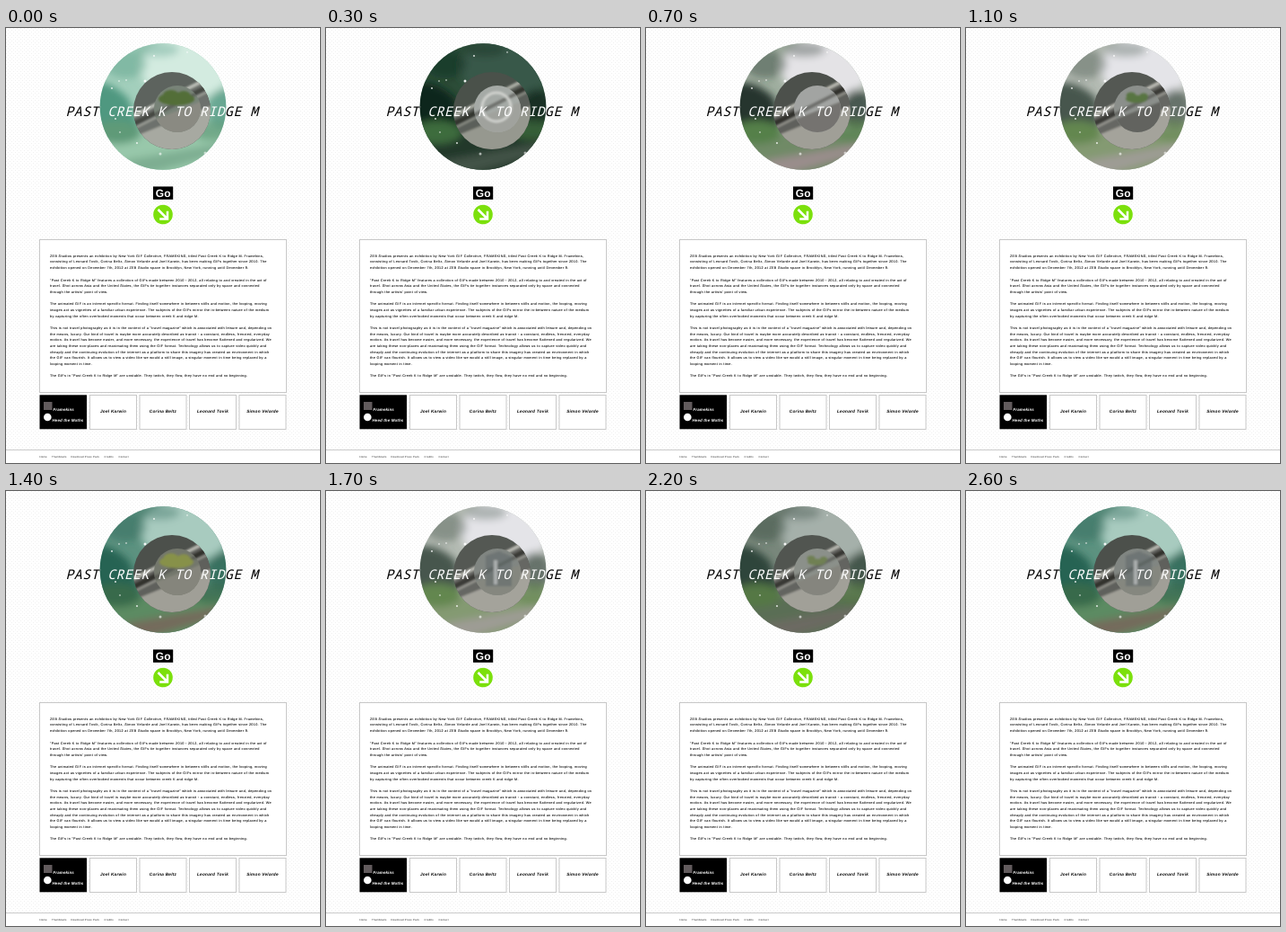
Write an HTML page that moves like this. It is 350x484 px and loops after 2700 ms.

```html
<!DOCTYPE html>
<html lang="en">
<head>
<meta charset="utf-8">
<title>Past Creek K to Ridge M</title>
<style>
html, body { margin: 0; width: 100%; height: 100%; overflow: hidden; background: #fff; }
svg { display: block; width: 350px; height: 484px; }
text { font-family: "Liberation Sans", Arial, sans-serif; text-rendering: geometricPrecision; white-space: pre; }
.title { font: italic 300 14.8px "Noto Sans Mono", "Liberation Mono", monospace; letter-spacing: .47px; }
.body { font-size: 3.75px; letter-spacing: .315px; fill: #000; stroke: #000; stroke-width: .06px; }
.tab { font-size: 4.7px; font-weight: bold; font-style: italic; letter-spacing: .25px; }
.logo { font-size: 4.5px; letter-spacing: .1px; }
.foot { font-size: 2.73px; letter-spacing: .26px; fill: #111; }
</style>
</head>
<body>
<svg viewBox="0 0 350 484" xmlns="http://www.w3.org/2000/svg">
  <defs>
    <pattern id="dots" width="4" height="4" patternUnits="userSpaceOnUse">
      <path d="M0 0h1v1h-1zM2 2h1v1h-1z" fill="#f0f0f0"/>
    </pattern>
    <clipPath id="big"><circle cx="175" cy="87.5" r="70.3"/></clipPath>
    <clipPath id="mid"><circle cx="185" cy="92" r="43"/></clipPath>
    <clipPath id="small"><circle cx="191" cy="90" r="26"/></clipPath>
    <mask id="outside" maskUnits="userSpaceOnUse" x="0" y="0" width="350" height="484">
      <rect width="350" height="484" fill="#fff"/><circle cx="175" cy="87.5" r="70.3"/>
    </mask>
    <filter id="soft" x="-50%" y="-50%" width="200%" height="200%"><feGaussianBlur stdDeviation="4"/></filter>
    <filter id="haze" x="-50%" y="-50%" width="200%" height="200%"><feGaussianBlur stdDeviation=".8"/></filter>
  </defs>
  <rect width="350" height="484" fill="#fff"/>
  <rect width="350" height="470" fill="url(#dots)"/>
  <g id="photo" clip-path="url(#big)"></g>
  <g id="window" clip-path="url(#mid)"></g>
  <g id="view" clip-path="url(#small)"></g>
  <g id="page"></g>
</svg>
<script>
const STEP = 100, STEPS = 27;
const TITLE = "PAST CREEK K TO RIDGE M";

const COPY = [
  "ZEB Studios presents an exhibition by New York GIF Collective, FRAMEKINS, titled Past Creek K to Ridge M. Framekins,",
  "consisting of Leonard Tovik, Corina Beltz, Simon Velarde and Joel Karwin, has been making GIFs together since 2010. The",
  "exhibition opened on December 7th, 2012 at ZEB Studio space in Brooklyn, New York, running until December 9.",
  "",
  "\"Past Creek K to Ridge M\" features a collection of GIFs made between 2010 - 2012, all relating to and created in the act of",
  "travel. Shot across Asia and the United States, the GIFs tie together instances separated only by space and connected",
  "through the artists' point of view.",
  "",
  "The animated GIF is an internet specific format. Finding itself somewhere in between stills and motion, the looping, moving",
  "images act as vignettes of a familiar urban experience. The subjects of the GIFs mirror the in-between nature of the medium",
  "by capturing the often overlooked moments that occur between creek K and ridge M.",
  "",
  "This is not travel photography as it is in the context of a \"travel magazine\" which is associated with leisure and, depending on",
  "the means, luxury. Our kind of travel is maybe more accurately described as transit - a constant, endless, frenzied, everyday",
  "motion. As travel has become easier, and more necessary, the experience of travel has become flattened and regularized. We",
  "are taking these non-places and reanimating them using the GIF format. Technology allows us to capture video quickly and",
  "cheaply and the continuing evolution of the internet as a platform to share this imagery has created an environment in which",
  "the GIF can flourish. It allows us to view a video like we would a still image, a singular moment in time being replaced by a",
  "looping moment in time.",
  "",
  "The GIFs in \"Past Creek K to Ridge M\" are unstable. They twitch, they flow, they have no end and no beginning."
];

// sky, trees, far field, hedge, ground, track
const SCENES = [
  ["#d3ebe0", "#4f9880", "#a3cfbc", "#5f9a78", "#98c8aa", "#78a98d"],
  ["#e4e3e6", "#26352e", "#9fae9f", "#55804a", "#6f8a66", "#a38f93"],
  ["#a8cbbf", "#286353", "#5c9280", "#386a4c", "#5c8b62", "#78645a"],
  ["#39594a", "#10251c", "#2c4d38", "#3e6c3d", "#20392a", "#48594c"],
  ["#a5b0aa", "#2f443a", "#78877b", "#547844", "#5a6e54", "#706a66"],
  ["#e4e4e8", "#46564d", "#b3bab2", "#64874f", "#849a72", "#a39d9b"]
];

// backdrop, lower half, foliage colour, foliage size, pale ring or tower
const VIEWS = [
  ["#788378", "#8a8a82", "#526e38", 1, 0],
  ["#7f847a", "#77766f", "#6d8a4a", 1, 0],
  ["#8b8f8b", "#62635f", "#587542", .6, 0],
  ["#a5aaa6", "#a0a29d", "#89918a", 0, 1],
  ["#8b908a", "#85857e", "#6f8052", .5, 0],
  ["#73776c", "#85857b", "#87914a", .95, 0],
  ["#90958e", "#85867f", "#78865c", .5, 0],
  ["#a2a4a2", "#75736f", "#8b8e8b", 0, 0],
  ["#818682", "#85877f", "#60686a", 0, 2]
];

const DROPS = [[155, 59], [127, 116], [122, 101], [172, 140], [165, 31], [202, 27], [235, 46], [126, 59], [146, 128], [222, 139], [118, 67], [134, 58]];

const $ = id => document.getElementById(id);
const attrs = o => Object.entries(o).map(([k, v]) => `${k}="${v}"`).join(" ");
const tag = (name, o) => `<${name} ${attrs(o)}/>`;
const rect = (x, y, width, height, fill, more = {}) => tag("rect", {x, y, width, height, fill, ...more});
const oval = (cx, cy, rx, ry, fill, more = {}) => tag("ellipse", {cx, cy, rx, ry, fill, ...more});
const disc = (cx, cy, r, fill, more = {}) => tag("circle", {cx, cy, r, fill, ...more});
const path = (d, fill, more = {}) => tag("path", {d, fill, ...more});
const text = (x, y, s, cls, more = {}) => `<text ${attrs({x, y, class: cls, ...more})}>${s}</text>`;
const panel = (x, y, w, h) => rect(x, y, w, h, "#fff", {stroke: "#c8c8c8"});

function photo(n) {
  const [sky, trees, field, hedge, ground, track] = SCENES[n];
  const dx = (n * 7) % 13 - 6;
  const drops = DROPS.map(([x, y], i) =>
    disc(x, y, i % 3 ? .9 : 1.5, "#fff", {opacity: i % 2 ? .6 : .9})).join("");
  return rect(100, 12, 150, 150, field) +
    `<g filter="url(#soft)">` +
    oval(200, 44, 50, 36, sky) +
    oval(133, 40, 24, 16, trees, {opacity: .4}) +
    path(`M95 62Q${120 + dx} 56 ${142 + dx} 78L150 112H95Z`, trees) +
    oval(175 + dx, 24, 24, 8, trees, {opacity: .35}) +
    oval(236 - dx, 90, 17, 22, trees, {opacity: .7}) +
    rect(95, 116, 160, 60, ground) +
    oval(124, 116, 27, 13, hedge) +
    oval(230, 114, 24, 11, hedge, {opacity: .7}) +
    path("M128 148L242 128L248 137L150 165Z", track, {opacity: .85}) +
    `</g>` + drops;
}

function pane(n) {
  const tint = [.12, 0, 0, .1, .05, .05][n];
  return rect(140, 47, 90, 90, "#4c504b") +
    `<g filter="url(#haze)">` +
    path("M135 103L235 53V140H135Z", "#5f605b") +
    path("M135 99L235 49V53L135 103Z", "#b9b9b1") +
    path("M135 107L235 57V64L135 114Z", "#30332f") +
    path("M135 114L235 64V67L135 117Z", "#8e8e87") +
    path("M135 124L235 84V140H135Z", "#a09f97") +
    `</g>` + rect(140, 47, 90, 90, SCENES[n][0], {opacity: tint});
}

function view(n) {
  const [back, low, leaf, size, extra] = VIEWS[n];
  let s = rect(164, 63, 54, 54, back) + `<g filter="url(#haze)">` +
    path("M160 104L222 80V120H160Z", low) +
    path("M160 97L222 66V70L160 102Z", "#4c4e49", {opacity: .6});
  if (size) {
    s += oval(190, 79, 20 * size, 7 * size, leaf) +
      oval(184, 75, 9 * size, 6 * size, leaf) +
      oval(198, 76, 8 * size, 6 * size, leaf);
  }
  if (extra === 1) s += disc(190, 88, 16, "none", {stroke: "#d0d2ce", "stroke-width": 3});
  if (extra === 2) s += path("M178 72L193 67L207 73V106H178Z", leaf, {opacity: .55}) + rect(187, 77, 4, 27, "#aaaeae");
  return s + "</g>";
}

function header() {
  const title = fill => text(66.5, 97.8, TITLE, "title", {fill});
  return `<g mask="url(#outside)">${title("#000")}</g><g clip-path="url(#big)">${title("#fff")}</g>` +
    rect(164, 176.4, 22.2, 14.4, "#000") +
    text(175.2, 187.8, "Go", "", {fill: "#fff", "font-size": 12, "font-weight": "bold", "text-anchor": "middle"}) +
    disc(175, 207.5, 10.8, "#7be00c") +
    path("M169.5 202L179 211.5M180 203.8V212.5H171.2", "none", {stroke: "#fff", "stroke-width": 2.5});
}

function article() {
  return panel(37.5, 235.5, 275, 170) +
    COPY.map((line, i) => line && text(49, (254.8 + i * 6.68).toFixed(2), line, "body")).join("");
}

function tabs() {
  const names = ["Joel Karwin", "Corina Beltz", "Leonard Tovik", "Simon Velarde"];
  return rect(37.5, 408.3, 52.5, 38, "#000") +
    rect(42, 416, 9.5, 9, "#625b5d") +
    disc(46.3, 433, 4.3, "#fff") +
    text(52.5, 426, "Framekins", "tab logo", {fill: "#fff"}) +
    text(51.5, 437.6, "Heed the Moths", "tab logo", {fill: "#fff"}) +
    names.map((name, i) => {
      const x = 93.5 + i * 55.5;
      return panel(x, 408.5, 52, 38) +
        text(x + 26, 428.4, name, "tab", {fill: "#000", "text-anchor": "middle"});
    }).join("");
}

function footer() {
  const links = [[37.5, "Home"], [51, "Thumbnails"], [72.5, "Download Press Pack"], [109.5, "Credits"], [125.5, "Contact"]];
  return rect(0, 469, 350, 15, "#fff") + rect(0, 469, 350, 1, "#ccc") +
    links.map(([x, label]) => text(x, 478.2, label, "foot")).join("");
}

function draw(now) {
  const n = Math.floor(now / STEP) % STEPS;
  if (n === shown) return;
  shown = n;
  $("photo").innerHTML = photo(n % 6);
  $("window").innerHTML = pane(n % 6);
  $("view").innerHTML = view(n % 9);
}

let shown = -1, start = null;
function tick(now) {
  if (start === null) start = now;
  draw(now - start);
  requestAnimationFrame(tick);
}

$("page").innerHTML = header() + article() + tabs() + footer();
draw(0);
requestAnimationFrame(tick);
</script>
</body>
</html>
```
